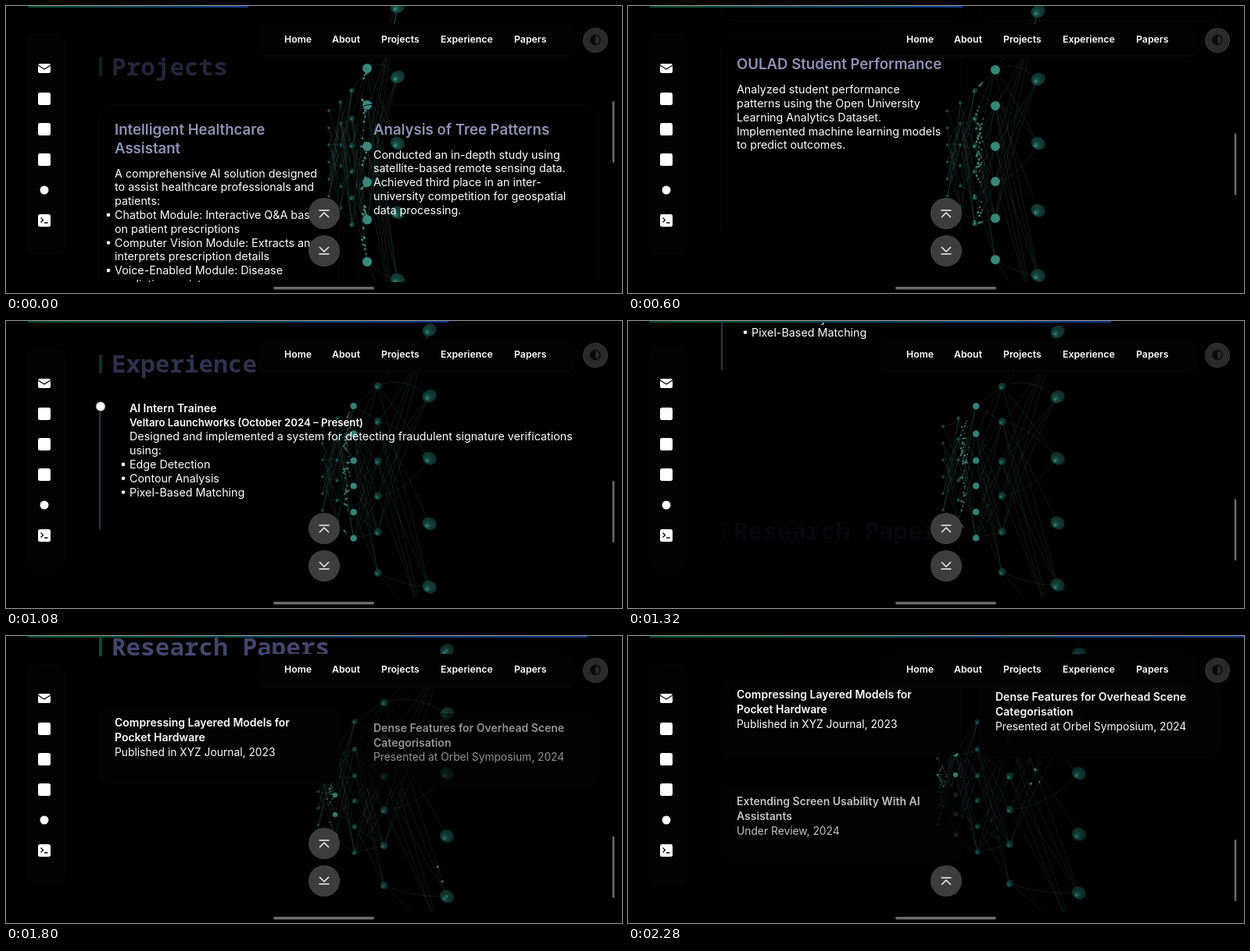
An HTML page with a canvas for the animation above (2400 ms loop, 788x368 px).

```html
<!DOCTYPE html>
<html lang="en">
<head>
<meta charset="utf-8">
<title>Portfolio scroll</title>
<style>
  html, body { margin: 0; width: 100%; height: 100%; overflow: hidden; background: #010101; }
  canvas, svg { position: absolute; left: 0; top: 0; width: 788px; height: 368px; }
  text { font-family: Inter, "Open Sans", sans-serif; fill: #fff; white-space: pre; }
  .body { font-size: 14.3px; }
  .note { font-size: 13.8px; }
  .title { font-size: 18.6px; font-weight: 600; fill: #8f91b6; }
  .strong { font-size: 14px; font-weight: 600; }
  .firm { font-size: 13.2px; font-weight: 600; }
  .nav { font-size: 12.3px; font-weight: 600; }
  .head { font: bold 31px "Noto Sans Mono", "DejaVu Sans Mono", monospace; fill: #43466c; }
  .line { fill: none; stroke: #f4f4f4; stroke-width: 1.5; }
  .card { fill: none; stroke: #070707; }
  .solid { fill: #030303; }
</style>
</head>
<body>
<canvas id="net" width="788" height="368"></canvas>
<svg id="ui" viewBox="0 0 788 368"></svg>
<script>
const LOOP = 2400, STEP = 120, STEPS = LOOP / STEP;
const $ = id => document.getElementById(id);

// Piecewise linear curve through [step, value, step, value, ...]
function curve(k, p) {
  if (k <= p[0]) return p[1];
  for (let i = 2; i < p.length; i += 2)
    if (k <= p[i]) return p[i - 1] + (p[i + 1] - p[i - 1]) * (k - p[i - 2]) / (p[i] - p[i - 2]);
  return p[p.length - 1];
}

const scrollKeys = [0, 0, 1, 47, 2, 77, 3, 150, 4, 283, 5, 367, 6, 410, 7, 485, 8, 612, 9, 735,
  10, 815, 11, 940, 12, 1031, 13, 1060, 14, 1141, 15, 1195, 16, 1218, 17, 1228, 18, 1231];
const progressKeys = [0, 310, 2, 371, 5, 428, 9, 566, 13, 670, 15, 744, 18, 788];

// Opacity and vertical offset of the parts that fade in
const fades = {
  projects: { alpha: [0, .52, 2, .68], shift: [0, 0, 2, -7] },
  oulad: { alpha: [2, 0, 3, .35, 4, .75, 5, 1] },
  experience: { alpha: [6, .2, 9, .7, 11, 1] },
  intern: { alpha: [6, 0, 7, .35, 8, .75, 9, 1] },
  research: { alpha: [11, .1, 13, .4, 15, 1] },
  paper1: { alpha: [12, 0, 13, .27, 14, .7, 15, 1], shift: [13, -3, 15, 0] },
  paper2: { alpha: [13, 0, 14, .3, 15, .58, 16, .8, 19, .98], shift: [14, 6, 15, 3.5, 19, 0] },
  paper3: { alpha: [15, 0, 17, .3, 19, .76], shift: [16, 8, 19, 0] }
};

// ---- Page markup: y is the optical middle of a line ----
const sizes = { body: 14.3, note: 13.8, title: 18.6, strong: 14, firm: 13.2, nav: 12.3, head: 31 };
const text = (cls, x, y, s) => `<text class="${cls}" x="${x}" y="${y + sizes[cls] * .36}">${s}</text>`;
const rect = (x, y, w, h, r, attrs) => `<rect x="${x}" y="${y}" width="${w}" height="${h}" rx="${r}" ${attrs}/>`;
const circle = (x, y, r, fill = '#fff') => `<circle cx="${x}" cy="${y}" r="${r}" fill="${fill}"/>`;
const path = (d, attrs = 'class="line"') => `<path d="${d}" ${attrs}/>`;
const group = (id, ...parts) => `<g id="${id}">${parts.join('')}</g>`;
const card = (x, y, h, solid = '') => rect(x, y, 307, h, 14, `class="card ${solid}"`);

// A leading "*" marks a bullet
const lines = (x, y, list) => list.map((s, i) => {
  const cy = y + i * 17.8;
  return s[0] === '*' ? circle(x - 8, cy, 2.3) + text('body', x, cy, s.slice(1)) : text('body', x, cy, s);
}).join('');
const heading = (id, y, s) => group(id,
  rect(119, y - 12, 4, 24, 0, 'fill="#0c4a2c"'), text('head', 135, y, s));
const paper = (id, x, y, a, b, note) => group(id, card(x - 20, y - 18, 96, 'solid'),
  text('strong', x, y, a), text('strong', x, y + 19, b), text('note', x, y + 38, note));

const page = group('page',
  heading('projects', 78, 'Projects'),
  card(119.5, 126.5, 259), card(450.5, 126.5, 259),
  text('title', 139, 158, 'Intelligent Healthcare'),
  text('title', 139, 182, 'Assistant'),
  lines(139, 214.5, [
    'A comprehensive AI solution designed', 'to assist healthcare professionals and', 'patients:',
    '*Chatbot Module: Interactive Q&amp;A based', 'on patient prescriptions',
    '*Computer Vision Module: Extracts and', 'interprets prescription details',
    '*Voice-Enabled Module: Disease', 'prediction assistance']),
  text('title', 470, 158, 'Analysis of Tree Patterns'),
  lines(470, 190.5, [
    'Conducted an in-depth study using', 'satellite-based remote sensing data.',
    'Achieved third place in an inter-', 'university competition for geospatial', 'data processing.']),
  group('oulad', card(119.5, 410, 260),
    text('title', 139, 441.5, 'OULAD Student Performance'),
    lines(139, 474, [
      'Analyzed student performance', 'patterns using the Open University',
      'Learning Analytics Dataset.', 'Implemented machine learning models', 'to predict outcomes.'])),
  heading('experience', 790, 'Experience'),
  group('intern',
    rect(119.3, 844, 1.6, 159, 0, 'fill="#34415e"'),
    circle(121, 844.5, 6.5, '#45506a'), circle(121, 844.5, 5.5),
    text('strong', 158, 847, 'AI Intern Trainee'),
    text('firm', 158, 865.5, 'Veltaro Launchworks (October 2024 – Present)'),
    lines(158, 883.3, [
      'Designed and implemented a system for detecting fraudulent signature verifications', 'using:',
      '*Edge Detection', '*Contour Analysis', '*Pixel-Based Matching'])),
  heading('research', 1209, 'Research Papers'),
  paper('paper1', 139, 1306, 'Compressing Layered Models for', 'Pocket Hardware', 'Published in XYZ Journal, 2023'),
  paper('paper2', 470, 1309, 'Dense Features for Overhead Scene', 'Categorisation', 'Presented at Orbel Symposium, 2024'),
  paper('paper3', 139, 1443, 'Extending Screen Usability With AI', 'Assistants', 'Under Review, 2024'));

// ---- Fixed interface ----
const icon = y => rect(41, y - 8, 16, 16, 2.5, 'fill="#fff"');
const sidebar = rect(27, 37, 49, 280, 10, 'fill="#030303" stroke="#060606"') +
  rect(41, 74, 16, 12, 2, 'fill="#fff"') +
  path('M41 76l8 5 8-5', 'fill="none" stroke="#050505" stroke-width="1.3"') +
  icon(119) + icon(158) + icon(197) + circle(49, 236, 5.5) + icon(275) +
  path('M44.5 271.5l3 3-3 3M49 278h4.5', 'fill="none" stroke="#050505" stroke-width="1.3"');

const nav = rect(322, 24, 406, 43, 13, 'fill="#050505"') + rect(322, 23, 406, 39, 12, 'fill="#020202"') +
  [[356, 'Home'], [417, 'About'], [480, 'Projects'], [556, 'Experience'], [650, 'Papers']]
    .map(([x, s]) => text('nav', x, 43, s)).join('');

const toggle = circle(754, 44, 16, '#363636') + circle(754, 44, 15, '#2a2a2a') +
  '<circle cx="754" cy="43.5" r="6" fill="none" stroke="#0a0a0a" stroke-width="1.5"/>' +
  path('M754 37.5a6 6 0 0 0 0 12z', 'fill="#0a0a0a"');

const disc = circle(407, 0, 20, '#464646') + circle(407, 0, 19.3, '#3d3d3d');
const buttons = group('up', disc, path('M400.5-4h13M401 5l6-6 6 6')) +
  `<g id="down" transform="translate(0 314)">${disc}${path('M401-5l6 6 6-6M400.5 4h13')}</g>`;

$('ui').innerHTML = `
  <defs>
    <clipPath id="view"><rect width="788" height="354"/></clipPath>
    <linearGradient id="blend"><stop stop-color="#04502c"/><stop offset="1" stop-color="#0c3a8c"/></linearGradient>
  </defs>
  <g clip-path="url(#view)">${page}</g>` +
  sidebar + nav + toggle + buttons +
  '<rect id="progress" x="28" width="282" height="2" fill="url(#blend)"/>' +
  '<rect id="thumb" x="775.7" width="2.6" height="79" rx="1.3" fill="#6a6a6a"/>' +
  rect(342, 360, 129, 3.5, 1.7, 'fill="#6c6c6c"');

// ---- Neural network ----
const layers = [
  { x: 501, v: 5, a: -.053, squeeze: .125, r: 9.5, ys: [1, 91, 176, 265, 351, 430] },
  { x: 462, v: 1.65, a: -.014, squeeze: .07, r: 5, ys: [80, 127, 180, 226, 274, 328] },
  { x: 442.5, v: .24, a: 0, squeeze: .03, r: 3.5, ys: [108, 144, 179, 212, 246, 280] },
  { x: 428, v: -.47, a: 0, squeeze: .05, r: 2.6, ys: [123, 150, 178, 205, 231, 259] },
  { x: 413, v: -.9, a: 0, squeeze: .04, r: 2.1, ys: [134, 156, 178, 200, 222, 244] }
];

let seed = 11;
const random = () => (seed = seed * 16807 % 2147483647) / 2147483647;

const edges = [];
layers.slice(1).forEach((next, j) => layers[j].ys.forEach((_, from) => next.ys.forEach((_, to) => {
  if (random() < .62)
    edges.push({ j, from, to, bend: (random() - .5) * (j ? 14 : 50), lead: (random() - .5) * .35 });
})));

const ctx = $('net').getContext('2d');

function nodeAt(j, i, k) {
  const l = layers[j];
  return [l.x + l.v * k + l.a * k * k, 178 + (l.ys[i] - 178) * (1 - l.squeeze * k / 19)];
}

function dot(x, y, r, fill, ry = r, turn = 0) {
  ctx.fillStyle = fill;
  ctx.beginPath();
  ctx.ellipse(x, y, r, ry, turn, 0, 7);
  ctx.fill();
}

function drawNode(j, i, k, wave) {
  const [x, y] = nodeAt(j, i, k), r = layers[j].r;
  const age = wave - j;
  if (j && age > 0 && age < 1) {
    dot(x, y, r * 1.25, '#22625a');
    dot(x, y, r * 1.1, '#398a7d');
    return;
  }
  const shade = ctx.createRadialGradient(x - r * .4, y + r * .35, 0, x, y, r * 1.1);
  shade.addColorStop(0, '#4fae9f');
  shade.addColorStop(.18, '#22665d');
  shade.addColorStop(.45, '#15433d');
  shade.addColorStop(1, '#0e2b28');
  dot(x, y, r, shade, j ? r : r * .84, j ? 0 : y < 130 ? -.5 : .5);
}

function drawPulse(e, p, c, q, wave) {
  const t = wave + e.lead - e.j;
  if (t <= 0 || t >= 1) return;
  for (let n = 0; n < 3; n++) {
    const s = Math.max(0, t - n * .07), m = 1 - s;
    dot(m * m * p[0] + 2 * m * s * c[0] + s * s * q[0],
        m * m * p[1] + 2 * m * s * c[1] + s * s * q[1],
        1.8 - .25 * e.j - n * .25, '#457f76');
  }
}

function drawNet(k) {
  const wave = 1.2 + .14 * k;
  ctx.clearRect(0, 0, 788, 368);
  ctx.save();
  ctx.beginPath();
  ctx.rect(0, 0, 788, 354);
  ctx.clip();
  ctx.globalAlpha = 1 - .012 * k;
  ctx.lineWidth = .75;
  ctx.strokeStyle = 'rgba(76,128,120,.3)';
  const routes = edges.map(e => {
    const p = nodeAt(e.j, e.from, k), q = nodeAt(e.j + 1, e.to, k);
    const c = [(p[0] + q[0]) / 2 + e.bend * .15, (p[1] + q[1]) / 2 + e.bend];
    ctx.beginPath();
    ctx.moveTo(...p);
    ctx.quadraticCurveTo(...c, ...q);
    ctx.stroke();
    return [e, p, c, q];
  });
  layers.forEach((l, j) => l.ys.forEach((_, i) => drawNode(j, i, k, wave)));
  routes.forEach((r, n) => {
    drawPulse(...r, wave);
    if (n % 9 === 4) drawPulse(...r, wave - 3.2);
  });
  ctx.restore();
}

function draw(k) {
  const top = curve(k, scrollKeys);
  const atEnd = k >= 17;
  drawNet(k);
  $('page').setAttribute('transform', `translate(0 ${-top})`);
  for (const id in fades) {
    const { alpha, shift = [0, 0] } = fades[id];
    $(id).setAttribute('opacity', curve(k, alpha));
    $(id).setAttribute('transform', `translate(0 ${curve(k, shift)})`);
  }
  $('progress').setAttribute('width', curve(k, progressKeys) - 28);
  $('thumb').setAttribute('y', 122 + top / 8.85);
  $('up').setAttribute('transform', `translate(0 ${atEnd ? 314 : 266})`);
  $('down').setAttribute('visibility', atEnd ? 'hidden' : 'visible');
}

const start = performance.now();
let shown = -1;
function tick() {
  const k = Math.floor((performance.now() - start) / STEP) % STEPS;
  if (k !== shown) draw(shown = k);
  requestAnimationFrame(tick);
}
tick();
</script>
</body>
</html>
```
